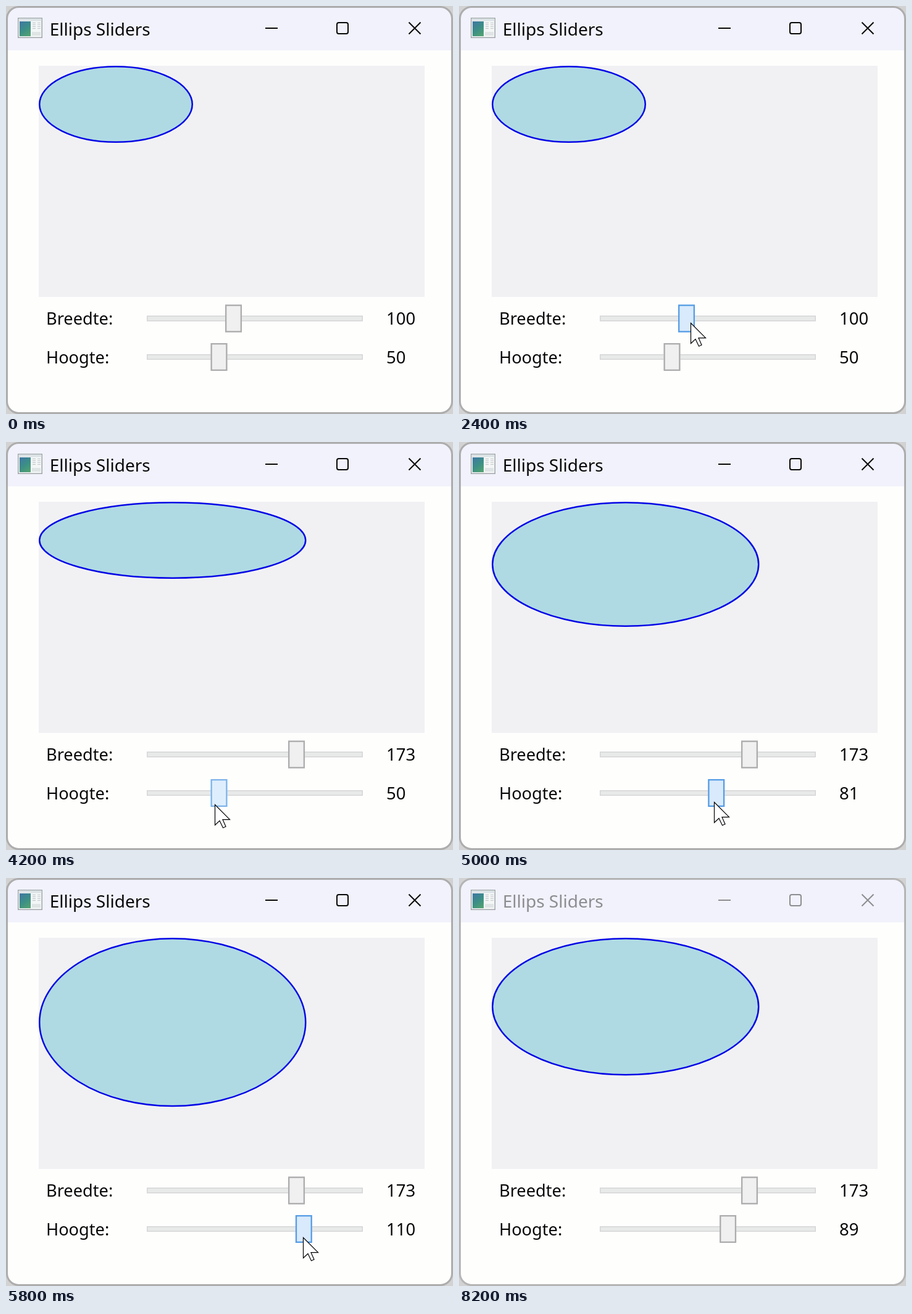
An HTML page with a canvas that plays this animation: 724x662 px, repeating every 8400 ms.

```html
<!DOCTYPE html>
<html lang="nl">
<head>
<meta charset="utf-8">
<title>Ellips Sliders</title>
<style>
html, body { margin: 0; width: 724px; height: 662px; overflow: hidden; background: #d2d2d2; }
canvas { display: block; }
</style>
</head>
<body>
<canvas id="stage" width="724" height="662"></canvas>
<script>
const ctx = document.getElementById('stage').getContext('2d');
const LOOP = 8400, STEP = 200;

const thumbColors = {
  idle: ['#f0f0f1', '#acacac'],
  hover: ['#dfeefd', '#7eb4ea'],
  pressed: ['#d9eafc', '#569de5']
};

const within = (t, from, to) => t >= from && t < to;

// Eased progress from 0 to 1 between two times.
function ease(t, from, to) {
  const p = Math.min(1, Math.max(0, (t - from) / (to - from)));
  return p * p * (3 - 2 * p);
}

// Every drag moves the pointer and its slider value together.
function pose(t) {
  const approach = ease(t, 1000, 2000);
  const widen = ease(t, 2400, 3200);
  const narrow = ease(t, 3200, 3800);
  const hop = ease(t, 3800, 4200);
  const stretch = ease(t, 4600, 5400);
  const shrink = ease(t, 5600, 6540);
  const leave = ease(t, 6540, 6800);
  return {
    w: 100 + 111 * widen - 37.6 * narrow,
    h: 50 + 62.4 * stretch - 23 * shrink,
    x: 635 - 260 * approach + 152 * widen - 53 * narrow - 136 * hop + 150 * stretch - 63 * shrink - 16 * leave,
    y: 4 + 510 * approach - 17 * widen + 17 * narrow + 74 * hop - 9 * stretch + 35 * shrink + 22 * leave
  };
}

function fillRect(x, y, w, h, color) {
  ctx.fillStyle = color;
  ctx.fillRect(x, y, w, h);
}

function box(x, y, w, h, fill, stroke, line) {
  fillRect(x, y, w, h, fill);
  ctx.strokeStyle = stroke;
  ctx.lineWidth = line;
  ctx.strokeRect(x + line / 2, y + line / 2, w - line, h - line);
}

function text(str, x, y, size, color = '#080808') {
  ctx.font = `${size}px "Noto Sans", "Open Sans", sans-serif`;
  ctx.fillStyle = color;
  ctx.fillText(str, x, y);
}

function polyline(...points) {
  points.forEach(([x, y], i) => i ? ctx.lineTo(x, y) : ctx.moveTo(x, y));
}

function drawIcon() {
  box(19, 19, 40, 33, '#f4f6f6', '#a0a6aa', 1.5);
  fillRect(20.5, 20.5, 37, 4, '#dce3e6');
  const panel = ctx.createLinearGradient(22, 26, 40, 49);
  panel.addColorStop(0, '#3f78a4');
  panel.addColorStop(0.5, '#3c8f86');
  panel.addColorStop(1, '#55a56d');
  fillRect(22, 25, 18, 24, panel);
  for (let y = 27; y < 39; y += 3) {
    fillRect(43, y, 5, 1, '#b9c0c4');
    fillRect(51, y, 5, 1, '#c2c8ca');
  }
  fillRect(42, 42, 14, 6, '#dfe5e5');
}

function drawWindow(active) {
  const ink = active ? '#080808' : '#8d8d90';
  fillRect(0, 0, 724, 662, '#d2d2d2');
  ctx.save();
  ctx.beginPath();
  ctx.roundRect(1.5, 1.5, 721, 659, 19);
  ctx.clip();
  fillRect(0, 0, 724, 662, '#fefefd');
  fillRect(0, 0, 724, 72, '#f1f2fb');
  ctx.restore();
  ctx.strokeStyle = active ? '#adadad' : '#b5b5b5';
  ctx.lineWidth = 3;
  ctx.stroke();

  drawIcon();
  text('Ellips Sliders', 70.7, 48, 28, ink);
  ctx.strokeStyle = ink;
  ctx.lineWidth = 2;
  ctx.beginPath();
  polyline([420, 36], [440, 36]);
  polyline([652.5, 26.5], [671.5, 45.5]);
  polyline([671.5, 26.5], [652.5, 45.5]);
  ctx.roundRect(536, 27, 18, 18, 3);
  ctx.stroke();
}

function drawEllipse(w, h) {
  fillRect(53, 97, 625, 375, '#f1f1f4');
  const rx = w * 1.25, ry = h * 1.25;
  ctx.beginPath();
  ctx.ellipse(53 + rx, 97 + ry, rx - 1.25, ry - 1.25, 0, 0, Math.PI * 2);
  ctx.fillStyle = '#afdae4';
  ctx.fill();
  ctx.strokeStyle = '#0505e6';
  ctx.lineWidth = 2.5;
  ctx.stroke();
}

function drawSlider(label, value, thumbX, y, state) {
  text(label, 65, y + 10, 27.2);
  text(Math.round(value), 616, y + 10, 27.5);
  box(228, y - 4.5, 350, 9, '#e8eaea', '#d6d6d6', 1.5);
  const [fill, stroke] = thumbColors[state];
  box(thumbX - 13.5, y - 22.5, 27, 45, fill, stroke, 2.3);
}

function drawCursor(x, y) {
  ctx.save();
  ctx.translate(Math.round(x) + 0.5, Math.round(y) + 0.5);
  ctx.beginPath();
  polyline([0, 0], [0, 33], [7.5, 26], [13, 37.5], [17.5, 35.5], [12.5, 24.2], [24, 24.2]);
  ctx.closePath();
  ctx.fillStyle = '#ffffff';
  ctx.fill();
  ctx.strokeStyle = '#000000';
  ctx.lineWidth = 1.2;
  ctx.stroke();
  ctx.restore();
}

function thumbState(t, enter, press, release, leave) {
  if (within(t, press, release)) return 'pressed';
  return within(t, enter, leave) ? 'hover' : 'idle';
}

function draw(t) {
  const { w, h, x, y } = pose(t);
  drawWindow(t < 8000);
  drawEllipse(w, h);
  drawSlider('Breedte:', w, 368.5 + (w - 100) * 1.39, 507, thumbState(t, 1800, 2200, 3800, 4000));
  drawSlider('Hoogte:', h, 345 + (h - 50) * 2.3, 569.5, thumbState(t, 4200, 4600, 6600, 6600));
  if (within(t, 1000, 7000)) drawCursor(x, y);
}

const start = performance.now();
function tick() {
  const t = (performance.now() - start) % LOOP;
  draw(Math.floor(t / STEP) * STEP);
  requestAnimationFrame(tick);
}
tick();
</script>
</body>
</html>
```
